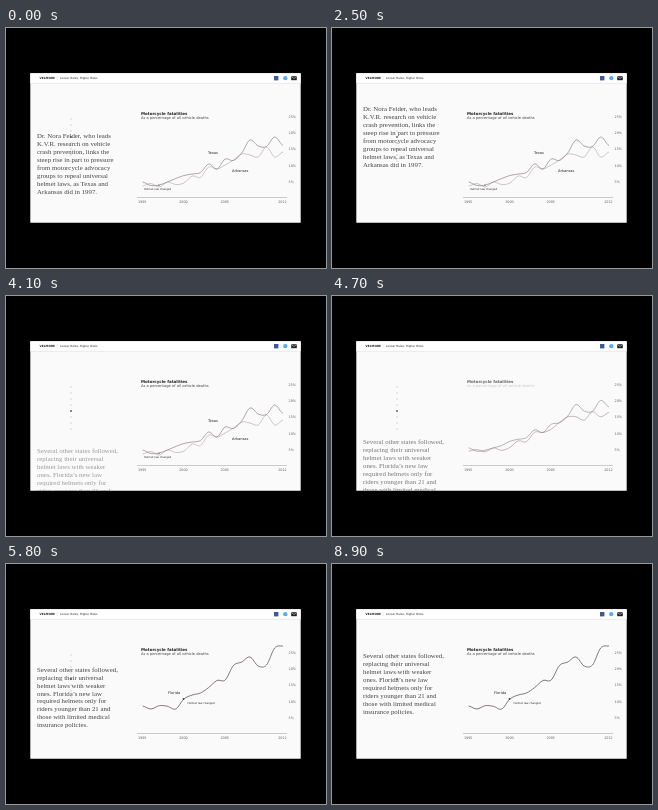
Animation, 320 px wide and 240 px high, one loop 9700 ms. Source, as an HTML page:

```html
<!DOCTYPE html>
<html lang="en">
<head>
<meta charset="utf-8">
<title>Motorcycle fatalities</title>
<style>
html, body { margin: 0; width: 100%; height: 100%; overflow: hidden; background: #000; }
svg { display: block; width: 320px; height: 240px; }
text { font-family: "DejaVu Sans", sans-serif; font-size: 3.6px; fill: #222; }
.story text { font-family: "Liberation Serif", serif; font-size: 6.85px; fill: #444; }
.axis text { font-size: 3.4px; fill: #666; }
.note { font-size: 2.65px; }
path { fill: none; stroke-width: .75; stroke-linejoin: round; }
</style>
</head>
<body>
<svg viewBox="0 0 320 240">
  <clipPath id="page"><rect x="24.3" y="45.3" width="270.4" height="149.4"/></clipPath>
  <g clip-path="url(#page)">
    <rect x="24" y="45" width="271" height="150" fill="#fafafa"/>
    <g id="dots"></g>
    <g id="first" class="story"></g>
    <g id="second" class="story"></g>

    <text id="title" x="135" y="86.7" style="font-size:4px;font-weight:bold">Motorcycle fatalities</text>
    <text id="subtitle" x="135" y="91" style="font-size:3.67px;fill:#444">As a percentage of all vehicle deaths</text>
    <g id="axis" class="axis"><path d="M131 169.5H281" stroke="#bbb"/></g>
    <path id="lineB"/>
    <path id="lineA"/>
    <g id="labelsA">
      <text x="202" y="126.3">Texas</text>
      <text x="226" y="143.8">Arkansas</text>
      <circle cx="153" cy="157.2" r=".6" fill="#555"/>
      <text class="note" x="138" y="162">Helmet law changed</text>
    </g>
    <g id="labelsB">
      <text x="162" y="130.3">Florida</text>
      <circle cx="177.5" cy="135" r=".9" fill="#444"/>
      <text class="note" x="181.5" y="139.8">Helmet law changed</text>
    </g>

    <rect x="24" y="45" width="271" height="10" fill="#fff"/>
    <path d="M24 55.3H295" stroke="#ddd" style="stroke-width:.6"/>
    <text x="33.5" y="51.1" style="font-size:2.9px;font-weight:bold">VELMORE</text>
    <path d="M51 48V52" stroke="#ccc" style="stroke-width:.4"/>
    <text x="54" y="51.1" style="font-size:2.85px">Looser Rules, Higher Risks</text>
    <rect x="268" y="48" width="4.4" height="4.4" fill="#3b5998"/>
    <circle cx="279.3" cy="50.2" r="2.1" fill="#55acee"/>
    <rect x="285.2" y="48.2" width="5.6" height="4" fill="#222"/>
    <path d="M285.3 48.5L288 50.5L290.7 48.5" stroke="#fff" style="stroke-width:.5"/>
  </g>
</svg>
<script>
const $ = id => document.getElementById(id);
const clamp = v => Math.max(0, Math.min(1, v));
const mix = (a, b, k) => a + (b - a) * k;
const fade = (id, opacity) => $(id).setAttribute('opacity', opacity);

function add(parent, tag, attrs, text = '') {
  const el = document.createElementNS('http://www.w3.org/2000/svg', tag);
  for (const key in attrs) el.setAttribute(key, attrs[key]);
  el.textContent = text;
  return parent.appendChild(el);
}

const stories = {
  first: ['Dr. Nora Felder, who leads', 'K.V.R. research on vehicle', 'crash prevention, links the',
    'steep rise in part to pressure', 'from motorcycle advocacy', 'groups to repeal universal',
    'helmet laws, as Texas and', 'Arkansas did in 1997.'],
  second: ['Several other states followed,', 'replacing their universal', 'helmet laws with weaker',
    'ones. Florida’s new law', 'required helmets only for', 'riders younger than 21 and',
    'those with limited medical', 'insurance policies.']
};
for (const id in stories)
  stories[id].forEach((line, i) => add($(id), 'text', { x: 31, y: 2.2 + i * 7.97 }, line));

const dots = Array.from({ length: 8 }, (_, i) => add($('dots'), 'circle', { cx: 65, cy: 91 + i * 6 }));

// Yearly chart heights, 1995 to 2012
const xOf = year => 136.7 + (year - 1995) * 8.25;
const texas = [154, 157.5, 157, 154, 150.5, 147.5, 146, 144.5, 136, 141, 131, 132.5, 125, 112, 118, 118.5, 109, 117.5];
const arkansas = [158, 155.5, 159, 154, 156.5, 155, 148, 149.5, 139, 141, 137, 132, 126, 127, 129, 119, 129, 124];
const florida = [142, 145, 141.7, 142.3, 145, 135, 131, 129, 123.5, 116.5, 116, 101.5, 98, 93, 102, 101, 84, 82];

for (const year of [1995, 2000, 2005, 2012])
  add($('axis'), 'text', { x: xOf(year) - .5, y: 175.2, 'text-anchor': 'middle' }, year);
for (let p = 5; p <= 25; p += 5)
  add($('axis'), 'text', { x: 282.5, y: 171 - p * 3.25 }, p + '%');

function curve(ys) {
  const at = i => ys[Math.max(0, Math.min(ys.length - 1, i))];
  const dx = 8.25 / 3;
  let d = `M${xOf(1995)} ${ys[0]}`;
  for (let i = 0; i < ys.length - 1; i++) {
    const x = xOf(1995 + i);
    d += `C${x + dx} ${at(i) + (at(i + 1) - at(i - 1)) / 6} ${x + 2 * dx} ${
      at(i + 1) - (at(i + 2) - at(i)) / 6} ${x + 3 * dx} ${at(i + 1)}`;
  }
  return d;
}

function drawLine(id, from, grey, k) {
  $(id).setAttribute('d', curve(from.map((y, i) => mix(y, florida[i], k))));
  const c = mix(grey, 82, k);
  $(id).setAttribute('stroke', `rgb(${c + 6},${c - 6},${c})`);
}

// Each nudge scrolls the story up by one notch
const nudges = [1900, 2300, 2700, 3100, 3500, 4100, 4800, 5100, 5600, 6500];
const scrolled = t => nudges.reduce((n, start) => n + clamp((t - start + 100) / 300), 0);

function place(id, y, opacity) {
  $(id).setAttribute('transform', `translate(0 ${y})`);
  fade(id, opacity);
}

function draw(t) {
  const n = scrolled(t);
  const y = 108 - 13.4 * n;
  place('first', y, clamp((y - 57) / 10.8) ** 2);
  place('second', 226 - 13.4 * n, clamp((n - 3.5) / 3.5));

  const active = t < 3300 ? 3 : 4;
  dots.forEach((dot, i) => {
    dot.setAttribute('r', i === active ? 1 : .8);
    dot.setAttribute('fill', i === active ? '#666' : '#ccc');
  });

  const m = clamp((t - 4450) / 700);
  const k = m < .5 ? 4 * m ** 3 : 1 - 4 * (1 - m) ** 3;
  const dip = Math.sin(Math.PI * m);
  drawLine('lineA', texas, 142, k);
  drawLine('lineB', arkansas, 184, k);
  fade('lineA', 1 - .25 * dip);
  fade('lineB', 1 - k * k);

  fade('title', 1 - .35 * dip);
  fade('subtitle', 1 - .8 * dip);
  fade('labelsA', clamp((4600 - t) / 300));
  fade('labelsB', clamp((t - 5200) / 500));
}

function tick() {
  draw(Math.floor(performance.now() % 9700 / 100) * 100);
  requestAnimationFrame(tick);
}
tick();
</script>
</body>
</html>
```
